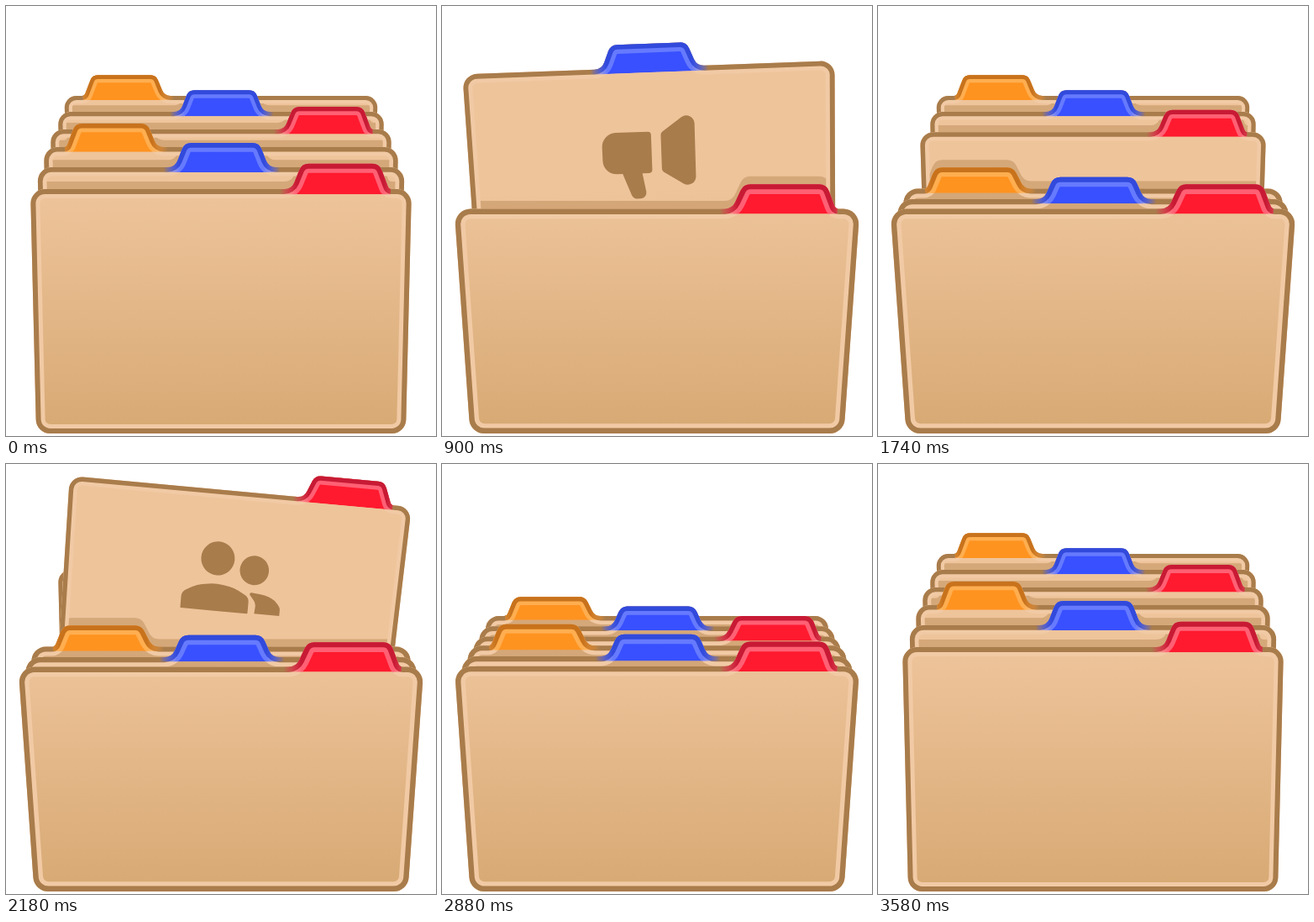
Write an HTML page with a canvas that moves like this. It is 512 by 512 pixels and loops after 3.6 s.

```html
<!DOCTYPE html>
<html lang="en">
<head>
<meta charset="utf-8">
<title>Card folders</title>
<style>
html, body { margin: 0; height: 100%; overflow: hidden; background: #fff; }
canvas { display: block; width: 512px; height: 512px; }
</style>
</head>
<body>
<canvas id="stage" width="512" height="512"></canvas>
<script>
const ctx = document.getElementById('stage').getContext('2d');
const LOOP = 3600, CX = 256, FLOOR = 509, W = 454, H = 290;
const BROWN = '#a97c4b';

const RED = { c: 142, edge: '200,26,52', light: '255,96,116', fill: '255,26,47' };
const BLUE = { c: 1, edge: '50,74,220', light: '102,122,255', fill: '56,80,255' };
const ORANGE = { c: -140, edge: '200,114,28', light: '255,174,80', fill: '255,147,32' };

const disc = (x, y, r) =>
  [[x - r, y - r, r], [x + r, y - r, r], [x + r, y + r, r], [x - r, y + r, r]];

// icon polygons: [x, y, corner radius]
const MEGAPHONE = [
  [[-61, 79, 17], [0, 79, 4], [0, 131, 4], [-61, 131, 17]],
  [[-38, 128, 0], [-13, 128, 0], [-7, 163, 7], [-25, 163, 7]],
  [[12, 81, 5], [54, 51, 10], [54, 156, 10], [12, 129, 5]],
];
const PEOPLE = [
  disc(-22, 90, 22.5),
  disc(28, 101.5, 19.5),
  [[-67, 160, 1], [-67, 138, 11], [-47, 127, 40], [-22, 123, 60], [3, 127, 40], [24, 138, 11], [24, 160, 1]],
  [[22, 131, 2], [45, 133, 40], [60, 139, 20], [67, 149, 8], [67, 159, 0], [33, 159, 0], [34, 145, 14]],
];

// front to back; rest and tilt hold [top width, top y]
const folders = [
  { tab: RED, rest: [454, 218], tilt: [483, 241.5] },
  { tab: BLUE, rest: [437, 192], tilt: [468, 230], rise: 154, turn: -2.7, icon: MEGAPHONE },
  { tab: ORANGE, rest: [422, 168], tilt: [454, 217.5] },
  { tab: RED, rest: [406, 147], tilt: [440, 207], rise: 126, turn: 5.65, icon: PEOPLE },
  { tab: BLUE, rest: [388, 126], tilt: [426, 195] },
  { tab: ORANGE, rest: [373, 107], tilt: [411, 183] },
];

const mix = (a, b, p) => a + (b - a) * p;
const span = (t, a, b) => Math.min(1, Math.max(0, (t - a) / (b - a)));
const ease = (t, a, b) => {
  const p = span(t, a, b);
  return p < .5 ? 2 * p * p : 1 - 2 * (1 - p) ** 2;
};
const dip = (t, a) => .18 * Math.sin(Math.PI * span(t, a, a + 160));

function pose(f, k, tilt, lift) {
  const w = mix(f.rest[0], f.tilt[0], tilt);
  f.y = mix(f.rest[1], f.tilt[1], Math.max(0, tilt) ** 1.7);
  f.h = k ? w * (.64 - .13 * tilt) : FLOOR - f.y;
  f.s = w / W;
  f.q = .969 - .048 * tilt;
  f.lift = lift * (f.rise || 0);
  f.rot = lift * (f.turn || 0) * Math.PI / 180;
}

function poseAll(t) {
  const back = ease(t, 2840, 3320);
  const drop2 = ease(t, 700, 1320), drop4 = ease(t, 2080, 2590);
  const tilts = [
    ease(t, 10, 300),
    drop2 + dip(t, 10),
    ease(t, 1270, 1520),
    drop4 + dip(t, 1660),
    ease(t, 2240, 2600),
    ease(t, 2320, 2660),
  ];
  const lifts = [0, ease(t, 70, 515) - drop2, 0, ease(t, 1740, 2040) - drop4, 0, 0];
  folders.forEach((f, k) => pose(f, k, tilts[k] * (1 - back), lifts[k]));
}

// perspective of a leaning sheet, origin at the middle of its top edge
function project(f, x, y) {
  const v = y / H, depth = 1 + v * (1 / f.q - 1);
  return [CX + x * f.s / depth, f.y + f.h * v / f.q / depth];
}

function rounded(f, points) {
  const path = new Path2D();
  const p = points.map(([x, y]) => project(f, x, y));
  const last = p[p.length - 1];
  path.moveTo((last[0] + p[0][0]) / 2, (last[1] + p[0][1]) / 2);
  p.forEach((a, i) => {
    const b = p[(i + 1) % p.length];
    path.arcTo(a[0], a[1], b[0], b[1], points[i][2] * f.s);
  });
  path.closePath();
  return path;
}

function outline(f) {
  const c = f.tab.c, e = W / 2;
  const left = c < -100 ? 5 : 13, right = c > 100 ? 5 : 13;
  return rounded(f, [
    [-e, H, 17], [-e, 0, 17],
    [c - 58, 0, left], [c - 46, -29, 12], [c + 46, -29, 12], [c + 58, 0, right],
    [e, 0, 17], [e, H, 17],
  ]);
}

function place(f) {
  const base = f.y + f.h;
  ctx.translate(CX, base - f.lift);
  ctx.rotate(f.rot);
  ctx.translate(-CX, -base);
}

function strokeInside(path, width, style) {
  ctx.lineWidth = 2 * width;
  ctx.strokeStyle = style;
  ctx.stroke(path);
}

function drawTab(f, path) {
  const { c, edge, light, fill } = f.tab;
  const [x0] = project(f, c - 72, 0), [x1] = project(f, c + 72, 0);
  const fade = rgb => {
    const g = ctx.createLinearGradient(x0, 0, x1, 0);
    [[0, 0], [.14, 1], [.86, 1], [1, 0]].forEach(([at, a]) => g.addColorStop(at, `rgba(${rgb},${a})`));
    return g;
  };
  const end = c > 100 ? 60 : 72, start = c < -100 ? 60 : 72;
  ctx.save();
  ctx.clip(rounded(f, [[c - start, -40, 0], [c + end, -40, 0], [c + end, 6, 0], [c - start, 6, 0]]));
  ctx.fillStyle = `rgb(${fill})`;
  ctx.fill(rounded(f, [[c - 52, 6, 0], [c - 43, -24, 4], [c + 43, -24, 4], [c + 52, 6, 0]]));
  strokeInside(path, 11 * f.s, fade(light));
  strokeInside(path, 5.8 * f.s, fade(edge));
  ctx.restore();
}

function drawFolder(f, front) {
  const path = outline(f);
  ctx.save();
  place(f);
  ctx.clip(path);

  const g = ctx.createLinearGradient(0, 218 + f.lift, 0, FLOOR + f.lift);
  g.addColorStop(0, '#eec49b');
  g.addColorStop(1, '#d7a973');
  ctx.fillStyle = g;
  ctx.fill(path);
  ctx.fillStyle = BROWN;
  (f.icon || []).forEach(shape => ctx.fill(rounded(f, shape)));

  if (front) {
    ctx.save();
    ctx.setTransform(1, 0, 0, 1, 0, -9 * front.s);
    place(front);
    ctx.fillStyle = 'rgba(130,75,10,.23)';
    ctx.fill(outline(front));
    ctx.restore();
  }
  strokeInside(path, 11 * f.s, '#f1caa5');
  strokeInside(path, 6 * f.s, BROWN);
  drawTab(f, path);
  ctx.restore();
}

function frame(now) {
  poseAll(now % LOOP);
  ctx.clearRect(0, 0, 512, 512);
  for (let k = folders.length - 1; k >= 0; k--) drawFolder(folders[k], folders[k - 1]);
  requestAnimationFrame(frame);
}
requestAnimationFrame(frame);
</script>
</body>
</html>
```
